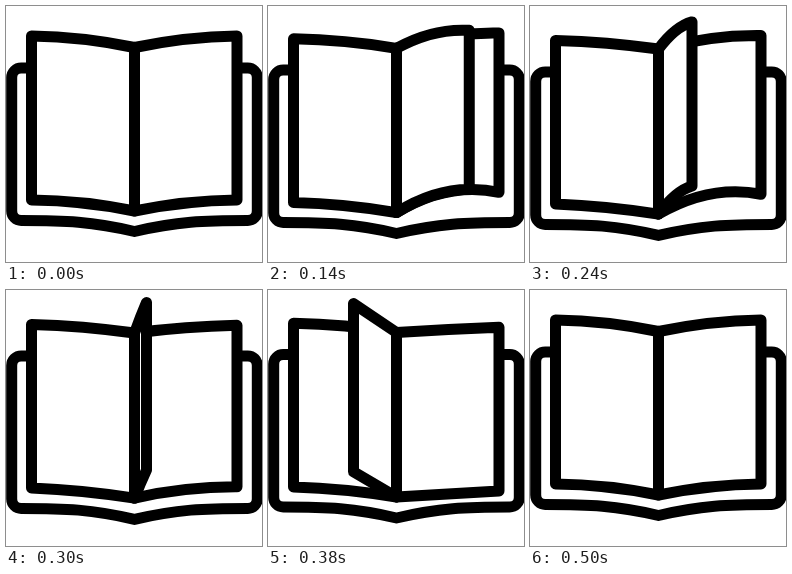
Write an HTML page with a canvas that moves like this. It is 256 by 256 pixels and loops after 0.56 s.

```html
<!DOCTYPE html>
<html lang="en">
<head>
<meta charset="utf-8">
<title>Book</title>
<style>
  html, body { margin: 0; width: 100%; height: 100%; overflow: hidden; background: #fff; }
  canvas { display: block; width: 100vw; height: 100vh; }
</style>
</head>
<body>
<canvas id="stage" width="256" height="256"></canvas>
<script>
const ctx = document.getElementById('stage').getContext('2d');
const LOOP = 560, STEP = 20, TURN_START = 40, TURN_END = 500;
const SPINE = 128.5, LEFT = 25.5, RIGHT = 231;
const TOP = 30, BOTTOM = 194, BEND = -5;

// Time and x of the turning page's free edge.
const edgePath = [[TURN_START, RIGHT], [100, 219], [180, 183.5], [300, 140.5],
                  [380, 85.5], [420, 60.5], [TURN_END, LEFT]];

function edgeX(t) {
  const i = edgePath.findIndex(([time]) => time >= t);
  if (i < 1) return edgePath[0][1];
  const [t0, x0] = edgePath[i - 1], [t1, x1] = edgePath[i];
  return x0 + (x1 - x0) * (t - t0) / (t1 - t0);
}

function drawCover(sink) {
  const top = 62 + sink, bottom = 214.5 + sink, tip = 225.5 + sink;
  ctx.beginPath();
  for (const side of [-1, 1]) {
    const x = d => SPINE + side * d;
    const edge = x(122.8);
    ctx.moveTo(x(106), top);
    ctx.arcTo(edge, top, edge, bottom, 9.5);
    ctx.arcTo(edge, bottom, x(100), bottom, 9.5);
    ctx.bezierCurveTo(x(70), bottom, x(42), bottom + 1, SPINE, tip);
  }
  ctx.stroke();
}

function drawPage(spine, x, top, bottom, bendTop, bendBottom = bendTop) {
  const mid = (SPINE + x) / 2;
  ctx.beginPath();
  ctx.moveTo(SPINE, spine.top);
  ctx.quadraticCurveTo(mid, (spine.top + top) / 2 + bendTop, x, top);
  ctx.lineTo(x, bottom);
  ctx.quadraticCurveTo(mid, (spine.bottom + bottom) / 2 + bendBottom, SPINE, spine.bottom);
  ctx.closePath();
  ctx.fill();
  ctx.stroke();
}

function draw(t) {
  const turn = Math.min(1, Math.max(0, (t - TURN_START) / (TURN_END - TURN_START)));
  const lift = Math.sin(Math.PI * turn);
  const sway = -lift * Math.sin(2 * Math.PI * turn); // up first, then down
  const sink = 4 * Math.max(0, lift) ** 1.5;
  const spine = { top: 41.5 + sink * 0.4, bottom: 205 + sink * 0.8 };

  ctx.fillStyle = '#fff';
  ctx.fillRect(0, 0, 256, 256);
  ctx.strokeStyle = '#000';
  ctx.lineWidth = 11;
  ctx.lineCap = ctx.lineJoin = 'round';

  drawCover(sink);
  drawPage(spine, LEFT, TOP + 4.5 * lift, BOTTOM + 4 * lift, BEND + 2 * lift);
  drawPage(spine, RIGHT,
    TOP + 2.5 * lift + 7.5 * sway,
    BOTTOM - 1.5 * lift + 11 * sway,
    BEND + 6 * sway,
    Math.min(0, BEND - 8 * lift + 18 * sway));

  if (turn > 0 && turn < 1) {
    const rise = Math.sin(Math.PI * turn ** 1.5);
    const hover = Math.sin(Math.PI / 2 * lift) ** 1.5;
    drawPage(spine, edgeX(t), TOP - 18 * rise, BOTTOM - 14 * hover,
      Math.min(0, BEND + 10 * sway));
  }
}

const start = performance.now();
function tick() {
  const t = (performance.now() - start) % LOOP;
  draw(Math.floor(t / STEP) * STEP);
  requestAnimationFrame(tick);
}
tick();
</script>
</body>
</html>
```
